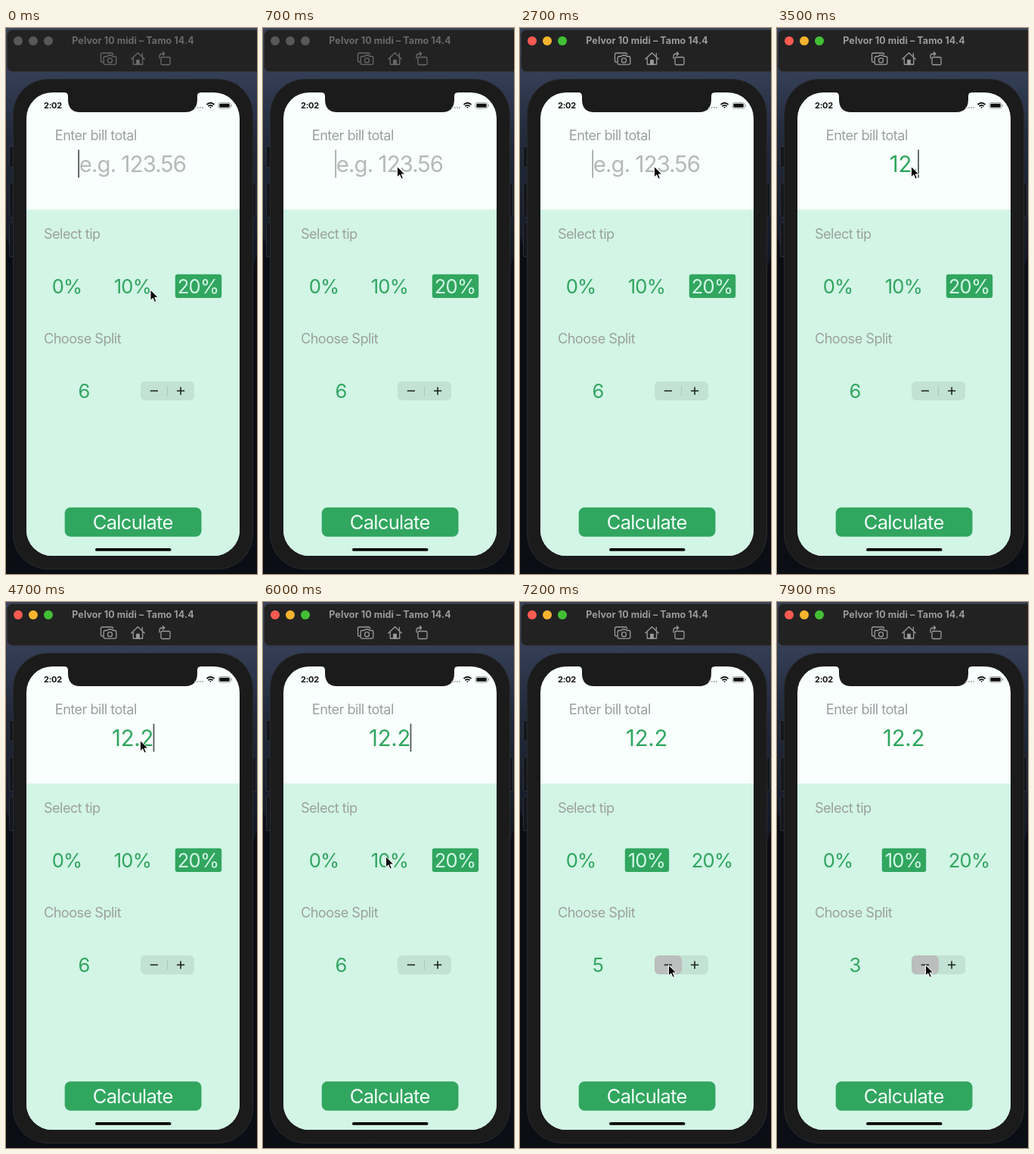
An HTML page that plays this animation: 332 by 720 pixels, repeating every 8000 ms.

```html
<!DOCTYPE html>
<html lang="en">
<head>
<meta charset="utf-8">
<title>Tip calculator</title>
<style>
  html, body { margin: 0; width: 100%; height: 100%; overflow: hidden; background: #0d1018; }
  svg { display: block; width: 332px; height: 720px; }
  text { font-family: Inter, Roboto, "Liberation Sans", sans-serif; font-weight: 400; letter-spacing: -.03em; text-anchor: middle; }
  .label { font-size: 18.2px; fill: #9ca19f; }
  .mid { font-size: 25.6px; fill: #31a65f; }
  .field { font-size: 29.3px; }
  .typed { letter-spacing: -.01em; fill: #31a65f; }
  .hint { fill: #b5b9b8; }
  .title { font-size: 12.5px; font-weight: 700; letter-spacing: .005em; fill: currentColor; }
  .icon { fill: none; stroke: currentColor; stroke-width: 1.3; stroke-linejoin: round; stroke-linecap: round; }
  .side { fill: #14161d; stroke: #34373f; stroke-width: .8; }
</style>
</head>
<body>
<svg viewBox="0 0 332 720">
  <defs>
    <linearGradient id="sky" x2="0" y2="1">
      <stop offset="0" stop-color="#3a455d"/>
      <stop offset=".09" stop-color="#333d54"/>
      <stop offset=".2" stop-color="#222a3b"/>
      <stop offset=".42" stop-color="#141824"/>
      <stop offset="1" stop-color="#0b0d15"/>
    </linearGradient>
    <clipPath id="screen"><rect x="27" y="85" width="282" height="611" rx="34"/></clipPath>
  </defs>

  <!-- desktop and window bar -->
  <rect width="332" height="720" fill="url(#sky)"/>
  <path d="M0 276L12 304V720H0ZM332 300L322 330V720H332Z" fill="#0c0e15"/>
  <rect x="1.5" y="2.5" width="336" height="55" rx="7" fill="#222223" stroke="#363638"/>
  <g id="lights">
    <circle cx="16" cy="17" r="6"/><circle cx="36" cy="17" r="6"/><circle cx="56" cy="17" r="6"/>
  </g>
  <g id="bar">
    <text class="title" x="168" y="21">Pelvor 10 midi – Tamo 14.4</text>
    <g class="icon">
      <path d="M128 45H127.5Q125.5 45 125.5 43V35Q125.5 33 127.5 33H139.5Q141.5 33 141.5 35"/>
      <path d="M131 37.5H134L135.5 36H139.5L141 37.5H144Q145.8 37.5 145.8 39.3V46.4Q145.8 48.2 144 48.2H131Q129.2 48.2 129.2 46.4V39.3Q129.2 37.5 131 37.5Z"/>
      <circle cx="137.5" cy="42.7" r="3"/>
      <path d="M165.8 41L174.5 32.8L183.2 41M168.3 39.5V48H180.7V39.5M180.3 37.5V33.5"/>
      <path d="M172.8 48V42.5H176.2V48Z" fill="currentColor"/>
      <rect x="205" y="38.5" width="12" height="10" rx="1.5"/>
      <path d="M203 40V37.5Q203 34 206.5 34H209M207.5 31.8L209.7 34L207.5 36.2"/>
    </g>
  </g>

  <!-- phone body -->
  <rect class="side" x="4.5" y="156.5" width="8" height="27" rx="1"/>
  <rect class="side" x="4.5" y="204.5" width="8" height="45" rx="1"/>
  <rect class="side" x="4.5" y="256.5" width="8" height="45" rx="1"/>
  <rect class="side" x="322" y="204.5" width="8.5" height="45" rx="1"/>
  <rect x="9.5" y="67.5" width="317" height="646" rx="46" fill="#1b1b1c" stroke="#292a2d"/>

  <!-- app screen -->
  <g clip-path="url(#screen)">
    <rect x="27" y="85" width="282" height="611" fill="#f9fffd"/>
    <rect x="27" y="239.4" width="282" height="457" fill="#d2f5e6"/>
    <path d="M77 84V85Q82 85 82 90V94Q82 111 98 111H237Q253 111 253 94V90Q253 85 258 85V84Z" fill="#1b1b1c"/>
  </g>
  <text x="62" y="106" font-size="11" fill="#111" style="font-weight:650;letter-spacing:-.02em">2:02</text>
  <path d="M249.5 105H261" stroke="#b5b9b8" stroke-width="2" stroke-dasharray="2 1.2"/>
  <g fill="none" stroke="#111" stroke-width="1.8">
    <path d="M265.5 101Q270.5 96.5 275.5 101M267.5 103.2Q270.5 100.6 273.5 103.2"/>
    <path d="M269.2 104.6L270.5 106L271.8 104.6Q270.5 103.6 269.2 104.6Z" fill="#111" stroke="none"/>
    <rect x="281" y="98.5" width="16" height="7.6" rx="2.2" stroke="#8d9190" stroke-width=".8"/>
    <rect x="282.3" y="99.8" width="13.4" height="5" rx="1.2" fill="#111" stroke="none"/>
    <path d="M298.4 101V103.6" stroke="#8d9190" stroke-width="1"/>
  </g>

  <text class="label" x="118.8" y="148">Enter bill total</text>
  <text id="amount" x="167.5" y="190"></text>
  <rect id="caret" y="160.5" width="1.7" height="37" fill="#4b5350"/>

  <text class="label" x="87.3" y="277.5">Select tip</text>
  <rect id="pick" y="324.8" height="31.2" rx="3" fill="#31a65f"/>
  <text class="mid" x="80.6" y="350">0%</text>
  <text class="mid" id="ten" x="167.4" y="350">10%</text>
  <text class="mid" id="twenty" x="254" y="350">20%</text>

  <text class="label" x="101" y="416">Choose Split</text>
  <text class="mid" id="split" x="103" y="488"></text>
  <rect x="178" y="466" width="71" height="25" rx="6" fill="#c2e2d5"/>
  <path id="divider" d="M213.5 472.5V485" stroke="#a9c8bc"/>
  <rect id="press" x="178" y="466" width="36" height="25" rx="6" fill="#bcbebd"/>
  <path d="M190.8 478.6H201M226 478.6H236.2M231.1 473.5V483.7" stroke="#161a18" stroke-width="1.5"/>

  <rect x="77.7" y="632.3" width="180.8" height="38.4" rx="7.5" fill="#31a65f"/>
  <text class="mid" x="167.7" y="661" style="fill:#f3fffa">Calculate</text>
  <rect x="118" y="686" width="100.5" height="3.8" rx="1.9" fill="#050505"/>

  <path id="cursor" d="M0 0V14.3L3.3 11.3L5.5 16.5L7.9 15.5L5.7 10.4H10.2Z" fill="#080808" stroke="#fff" stroke-width="1" stroke-linejoin="round"/>
</svg>
<script>
const LOOP = 8000, STEP = 100;
const ACTIVATE = 800, PICK = 6300, SHOW = 6700;
const $ = id => document.getElementById(id);
const set = (id, attrs) => {
  for (const k in attrs) $(id).setAttribute(k, attrs[k]);
};

// time, text, caret x
const typing = [
  [0, "", 95.3], [2900, "1", 174], [3200, "12", 183],
  [3500, "12.", 186.2], [4600, "12.2", 194.6]
];
// time, tip x, tip y
const path = [
  [0, 191, 345], [100, 191, 345], [700, 177.5, 182.5], [5100, 177.5, 182.5],
  [5700, 162.5, 335.5], [6600, 162.5, 335.5], [7000, 196.5, 478.5], [8000, 196.5, 478.5]
];
const presses = [[7100, 7300], [7400, 7600], [7800, 8000]];
const lightsOn = ["#fb5b51", "#f7b42e", "#43bf35"];

const ease = u => u * u * (3 - 2 * u);
const last = (rows, t) => rows.filter(r => r[0] <= t).pop();

function cursorAt(t) {
  const i = Math.max(1, path.findIndex(p => p[0] > t));
  const [a, b] = [path[i - 1], path[i]];
  const u = ease((t - a[0]) / (b[0] - a[0]));
  return [a[1] + (b[1] - a[1]) * u, a[2] + (b[2] - a[2]) * u];
}

// One blink a second: hold, fade out, rest, fade in. A keystroke restarts it.
function blink(t, typedAt) {
  const age = t - typedAt;
  if (typedAt && age < 500) return 1;
  const p = (typedAt ? age - 200 : age) % 1000;
  if (p < 300) return 1;
  if (p < 500) return 1 - (p - 200) / 300;
  if (p < 700) return 0;
  return p < 800 ? .5 : 1;
}

function draw(t) {
  const [typedAt, text, caretX] = last(typing, t);
  const active = t >= ACTIVATE, picked = t >= PICK;

  $("amount").textContent = text || "e.g. 123.56";
  set("amount", { class: text ? "field typed" : "field hint" });
  set("caret", { x: caretX, opacity: picked ? 0 : blink(t, typedAt) });

  [...$("lights").children].forEach((c, i) =>
    c.setAttribute("fill", active ? lightsOn[i] : "#58585a"));
  set("bar", { color: active ? "#9b9b9d" : "#69696b" });

  set("pick", picked ? { x: 138.8, width: 58.4 } : { x: 223.8, width: 61.4 });
  $("ten").style.fill = picked ? "#d2f5e6" : "";
  $("twenty").style.fill = picked ? "" : "#d2f5e6";

  const held = presses.some(([a, b]) => t >= a && t < b);
  $("split").textContent = 6 - presses.filter(p => t >= p[0]).length;
  set("press", { opacity: held ? 1 : 0 });
  set("divider", { opacity: held ? 0 : 1 });

  set("cursor", {
    transform: `translate(${cursorAt(t)})`,
    opacity: picked && t < SHOW ? 0 : 1
  });
}

function tick() {
  draw(Math.floor(performance.now() % LOOP / STEP) * STEP);
  requestAnimationFrame(tick);
}
tick();
</script>
</body>
</html>
```
